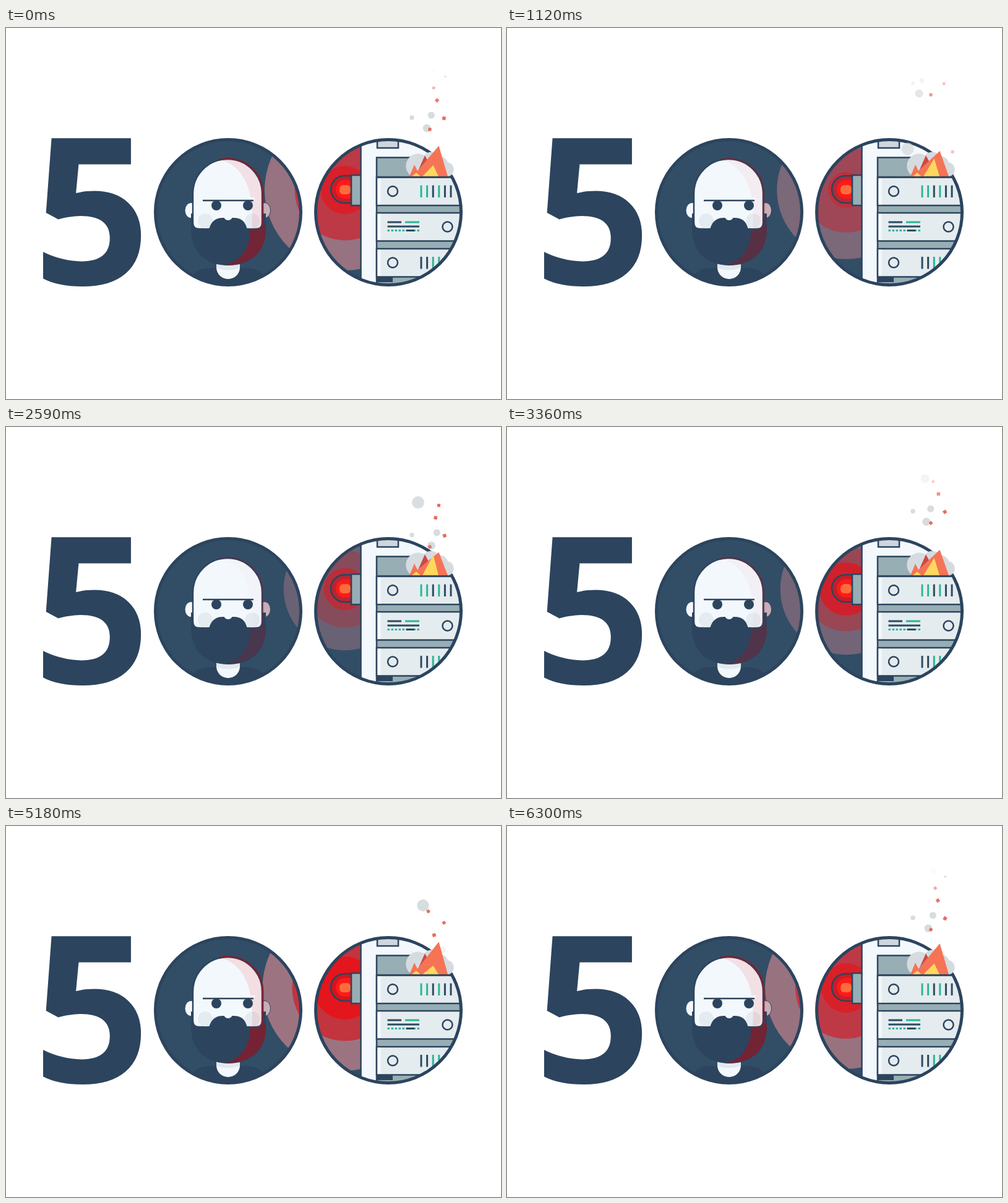
Write an HTML page that moves like this. It is 800 by 600 pixels and loops after 6370 ms.

```html
<!DOCTYPE html>
<html lang="en">
<head>
<meta charset="utf-8">
<title>500</title>
<style>
  html, body { margin: 0; width: 100%; height: 100%; overflow: hidden; background: #fff; }
  svg { display: block; width: 800px; height: 600px; }
  text { font: 700 331.5px "Open Sans", "Noto Sans", sans-serif; fill: #2c445e; }
  .navy { fill: #2c445e; }
  .line { stroke: #2c445e; stroke-width: 2.5; }
  .ring { fill: none; stroke: #2c445e; stroke-width: 5; }
  .skin { fill: #f3f8fd; }
  .metal { fill: #97aeb4; }
</style>
</head>
<body>
<svg viewBox="0 0 800 600">
  <defs>
    <clipPath id="left"><circle cx="359" cy="298" r="118"/></clipPath>
    <clipPath id="right"><circle cx="618" cy="298" r="118"/></clipPath>
    <g id="glow">
      <circle class="wave" cx="548" cy="262" fill="#eb9196"/>
      <circle class="wave" cx="548" cy="262" fill="#d7141e"/>
      <circle class="wave" cx="548" cy="262" fill="#eb0f16"/>
    </g>
  </defs>

  <text x="43.8" y="414.8">5</text>

  <g clip-path="url(#left)">
    <rect x="239" y="178" width="240" height="240" fill="#324e66"/>
    <use href="#glow"/>
    <path class="navy" d="M296 420C300 392 312 388 338 388H380C406 388 418 392 422 420Z"/>
    <path class="skin" d="M340 378H378V387A19 19 0 0 1 340 387Z"/>
    <path fill="#e2e9ee" d="M340 378H378V388Q359 395 340 388Z"/>
    <ellipse class="skin" cx="299" cy="295" rx="9.5" ry="12"/>
    <ellipse cx="418" cy="295" rx="9.5" ry="12.5" fill="#c9aeb8" stroke="#2c445e"/>
    <path class="navy" d="M299 300V325C299 364 325 384 359 384C395 384 420 364 420 325V300Z"/>
    <path class="warm" fill="#821e2d" d="M394 320H420V325C420 364 395 384 352 384C382 377 397 352 394 320Z"/>
    <path class="skin line" d="M302 268A56 56 0 0 1 414 268V315Q414 325 404 325H312Q302 325 302 315Z"/>
    <path class="warm" fill="none" stroke="#821e2d" stroke-width="3" d="M345 213A56 56 0 0 1 415 268V322"/>
    <circle cx="322" cy="312" r="12" fill="#e4ecf1"/>
    <circle cx="398" cy="312" r="12" fill="#e4ecf1"/>
    <path id="flush" fill="#e8303c" d="M345 213C384 222 402 262 397 325H404Q414 325 414 315V268A56 56 0 0 0 345 213Z"/>
    <ellipse class="eye navy" cx="340" cy="287" rx="8"/>
    <ellipse class="eye navy" cx="391" cy="287" rx="8"/>
    <rect class="skin" x="330" y="274" width="72" height="4"/>
    <path class="line" d="M318 279H400"/>
    <path class="navy" d="M328 326C331 312 340 307 350 307H368C379 307 387 312 390 326Z"/>
    <circle class="skin" cx="359" cy="303.500" r="7.500"/>
  </g>
  <circle class="ring" cx="359" cy="298" r="117.500"/>

  <g clip-path="url(#right)">
    <rect x="498" y="178" width="240" height="240" fill="#324e66"/>
    <use href="#glow"/>
    <path class="line" fill="#b4141e" fill-opacity=".35" d="M558 239H547A22 22 0 0 0 547 283H558Z"/>
    <path fill="#ff1a1a" d="M558 246H548A15 15 0 0 0 548 276H558Z"/>
    <rect x="539" y="254" width="18" height="15" rx="6" fill="#fb6c3c"/>
    <rect class="metal line" x="558" y="238" width="16" height="49"/>
    <rect class="skin line" x="573.500" y="170" width="180" height="260"/>
    <rect class="line" x="600" y="170" width="34" height="24" fill="#cfd6dd"/>
    <rect class="metal line" x="599" y="209.500" width="160" height="220"/>
    <rect class="navy" x="599" y="403" width="26" height="8"/>
    <g id="servers"></g>
  </g>
  <circle class="ring" cx="618" cy="298" r="117.500"/>

  <g id="particles"></g>
  <path fill="#d6dbe0" d="M656 240A15 15 0 0 1 676 206A14 14 0 0 1 699 207A15 15 0 0 1 714 217A12 12 0 0 1 716 240Z"/>
  <path fill="#cf4942" d="M662 240L677 206L695 240Z"/>
  <path id="flame" fill="#f57455"/>
  <path id="core" fill="#ffd75e"/>
  <path class="line" d="M600 241H723"/>
</svg>
<script>
const LOOP = 6370, STEP = 70, TOP = 60, SPEED = 0.05;
const NAVY = '#2c4a62', GREEN = '#2bb696';
const $ = id => document.getElementById(id);
const all = selector => [...document.querySelectorAll(selector)];
const clamp = v => Math.max(0, Math.min(1, v));
const swing = (t, peak) => Math.cos(2 * Math.PI * (t - peak) / LOOP);

function add(parent, tag, attrs) {
  const el = document.createElementNS('http://www.w3.org/2000/svg', tag);
  set(el, attrs);
  return parent.appendChild(el);
}
function set(el, attrs) {
  for (const name in attrs) el.setAttribute(name, attrs[name]);
}

// Rack units: top edge, knob position, bar colours (g = green, n = navy)
const servers = $('servers');
const bar = (x, y, width, height, fill) => add(servers, 'rect', { x, y, width, height, fill });
for (const [y, knob, bars] of [[241.5, 625, 'ggngnn'], [299, 713.5, ''], [357, 625, 'nngg']]) {
  add(servers, 'rect', { x: 599, y, width: 160, height: 45.5, fill: '#e5ecef', class: 'line' });
  bar(600.5, y + 1.5, 5, 42.5, '#f3f8fd');
  add(servers, 'circle', { cx: knob, cy: y + 22.5, r: 8, fill: 'none', class: 'line' });
  [...bars].forEach((c, i) => bar(669.5 + i * 9.6, y + 13, 3, 19.5, c === 'g' ? GREEN : NAVY));
}
bar(616.5, 312.5, 22.5, 3, NAVY);
bar(645, 312.5, 23, 3, GREEN);
bar(616.5, 319.5, 51.5, 3, NAVY);
for (let i = 0; i < 9; i++) bar(616.5 + i * 6, 326, 3.5, 3, i === 5 || i === 6 ? NAVY : GREEN);
bar(648, 326, 12, 3, NAVY);

// x at y = 150, sideways slope, starting height, size, half loops per rise
const smoke = [
  [677, .25, 162, 6.5, 1], [690, .3, 141, 5.5, 1], [656, 0, 145, 3.7, 1],
  [659, -.25, 251.5, 10, 2], [668, -.28, 69, 9.7, 2]
];
const sparks = [
  [706, .28, 97, 5, 1], [708, .03, 146, 5.5, 1], [694, -.08, 117, 5.5, 1],
  [685, 0, 164, 5, 1], [677, -.46, 78.5, 5, 2]
];
const particles = [
  ...smoke.map(p => [add($('particles'), 'circle', { r: 1, fill: '#d3d8dc' }), p, 0]),
  ...sparks.map(p => [add($('particles'), 'rect', { x: -.5, y: -.5, width: 1, height: 1, fill: '#e65c4b' }), p, 1])
];

function drawParticle([el, [x, slope, start, size, halves], spin], t) {
  const span = SPEED * LOOP / 2 * halves;
  const rise = start - TOP - SPEED * t;
  const y = TOP + (rise % span + span) % span;
  const scale = size * (.35 + .65 * clamp((y - TOP) / 45));
  const angle = spin * y * 5;
  set(el, {
    transform: `translate(${x + slope * (y - 150)} ${y}) rotate(${angle}) scale(${scale})`,
    opacity: clamp((y - TOP - 5) / 60) * clamp((205 - y) / 12) * .9
  });
}

const waves = all('.wave'), warm = all('.warm'), eyes = all('.eye');
// mean radius, swing of radius, peak time, mean opacity, swing of opacity
const waveShapes = [[117, 18, 5600, .44, .15], [74, 12, 5450, .47, .2], [40, 12, 4700, .6, .25]];

function draw(t) {
  waveShapes.forEach(([r, dr, peak, a, da], i) => {
    const s = swing(t, peak);
    set(waves[i], { r: r + dr * s, opacity: a + da * s });
  });
  const heat = swing(t, 5600);
  warm.forEach(el => set(el, { opacity: .6 + .28 * heat }));
  set($('flush'), { opacity: .075 + .06 * heat });

  const closed = clamp(1.6 - Math.abs(t % (LOOP / 2) - 1750) / 100);
  eyes.forEach(el => set(el, { ry: 8 - 6.8 * closed }));

  const flicker = swing(t, 5400);
  set($('flame'), { d: `M652 240L660 221L665 231L699.5 ${195 - 8 * flicker}L714 240Z` });
  set($('core'), { d: `M656 240L663 234L670 240ZM673 240L690.5 ${216 + 10 * flicker}L699 240Z` });
  particles.forEach(p => drawParticle(p, t));
}

function tick() {
  const t = performance.now() % LOOP;
  draw(Math.floor(t / STEP) * STEP);
  requestAnimationFrame(tick);
}
tick();
</script>
</body>
</html>
```
